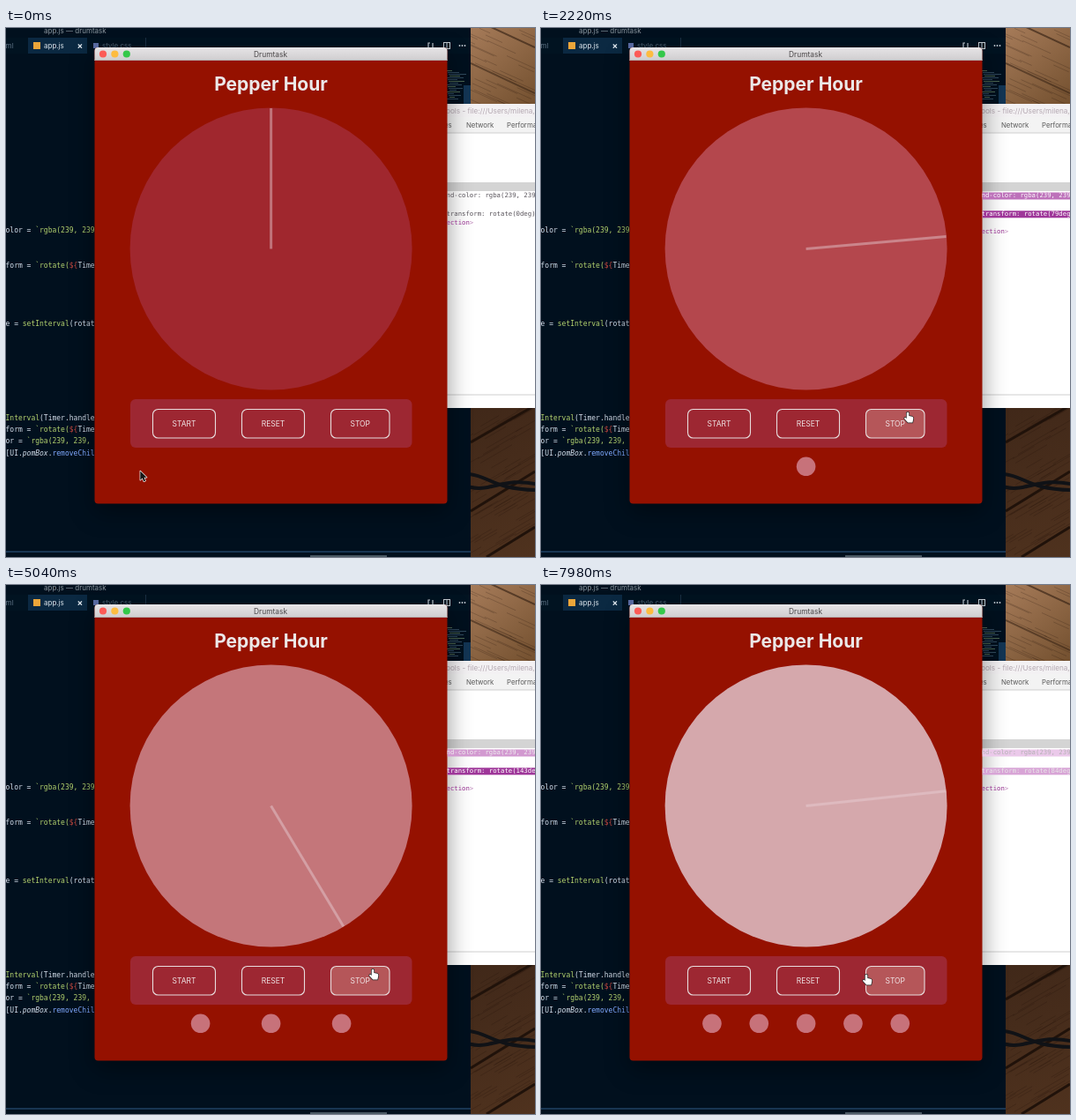
Write an HTML page with a canvas that moves like this. It is 600x600 px and loops after 8 s.

```html
<!DOCTYPE html>
<html lang="en">
<head>
<meta charset="utf-8">
<title>Pepper Hour</title>
<style>
html, body { margin: 0; width: 100%; height: 100%; overflow: hidden; background: #01101e; }
canvas { display: block; width: 100vw; height: 100vh; }
</style>
</head>
<body>
<canvas id="stage" width="600" height="600"></canvas>
<script>
const LOOP = 8000, STEP = 60;
const START = 615, STOP = 7399, MS_PER_DEG = 3.6, TURN = 360 * MS_PER_DEG;
const LAG = 22; // the inspector trails the dial slightly
const SANS = 'Inter, Roboto, sans-serif';
const MONO = '"DejaVu Sans Mono", monospace';
const CENTER = { x: 300.6, y: 250.5, r: 160 };
const DISC = [[160, 39, 46], [180, 71, 77], [189, 92, 98], [196, 118, 122], [204, 144, 146], [213, 168, 172]];
const BUTTONS = [
  { label: 'START', x: 166, w: 72 },
  { label: 'RESET', x: 267, w: 72 },
  { label: 'STOP', x: 368, w: 67.5 }
];
const POINTER = [
  [0, 152.3, 502.5], [150, 152.3, 502.5], [500, 205, 445], [1080, 207, 445],
  [1560, 346.7, 436.5], [1760, 416, 436], [7550, 416, 436], [7980, 369, 442]
];
const ARROW = new Path2D('M0 0V10.2L2.4 8L4 11.8L5.8 11L4.2 7.3H7.3Z');
const HAND = new Path2D('M-1.3 1A1.3 1.3 0 0 1 1.3 1V4L5 4.8Q6.4 5.2 6.3 7L5.4 11.5H.2L-3.8 7.2Q-4 5.6 -2.6 5.8L-1.3 7Z');

const stage = document.getElementById('stage').getContext('2d');
const backdrop = document.createElement('canvas');
backdrop.width = backdrop.height = 600;
let ctx = backdrop.getContext('2d');

const clamp = v => Math.max(0, Math.min(1, v));
const mix = (a, b, k) => a.map((v, i) => v + (b[i] - v) * k);
const rgb = (c, a = 1) => `rgba(${c.map(Math.round).join(',')},${a})`;

let seed = 7;
const random = () => (seed = seed * 16807 % 2147483647) / 2147483647;

function rect(x, y, w, h, fill) {
  ctx.fillStyle = fill;
  ctx.fillRect(x, y, w, h);
}

function box(x, y, w, h, radius, fill, stroke) {
  ctx.beginPath();
  ctx.roundRect(x, y, w, h, radius);
  if (fill) { ctx.fillStyle = fill; ctx.fill(); }
  if (stroke) { ctx.strokeStyle = stroke; ctx.stroke(); }
}

function disc(x, y, r, fill) {
  ctx.beginPath();
  ctx.arc(x, y, r, 0, 7);
  ctx.fillStyle = fill;
  ctx.fill();
}

function line(points, color, width) {
  ctx.beginPath();
  points.forEach(([x, y]) => ctx.lineTo(x, y));
  ctx.strokeStyle = color;
  ctx.lineWidth = width;
  ctx.stroke();
}

function text(s, x, y, font, fill, align = 'left') {
  ctx.font = font;
  ctx.fillStyle = fill;
  ctx.textAlign = align;
  ctx.textBaseline = 'middle';
  ctx.fillText(s, x, y);
}

// Spans are [text, colour, style], laid out one after another.
function code(y, ...spans) {
  let x = -0.5;
  for (const [s, color, style = ''] of spans) {
    text(s, x, y, `${style} 8px ${MONO}`, color);
    x += ctx.measureText(s).width;
  }
}

function drawWood() {
  const wood = (y, h, from, to, slope) => {
    const g = ctx.createLinearGradient(527, y, 600, y + h);
    g.addColorStop(0, from);
    g.addColorStop(1, to);
    rect(527, y, 73, h, g);
    for (let i = 0; i < h / 3; i++) {
      const x = 515 + random() * 70, top = y + random() * h, len = 12 + random() * 30;
      line([[x, top], [x + len, top + len * slope]], 'rgba(25,12,5,.2)', 1);
    }
  };
  ctx.save();
  ctx.beginPath();
  ctx.rect(527, 0, 73, 600);
  ctx.clip();
  wood(425, 175, '#402819', '#4f321e', -0.58);
  wood(0, 87, '#a67b59', '#73502f', 0.45);
  line([[548, -2], [600, 22]], 'rgba(45,27,15,.6)', 2);
  line([[527, 40], [600, 74]], 'rgba(45,27,15,.5)', 2);
  line([[527, 470], [600, 428]], '#20120a', 3);
  line([[527, 548], [600, 503]], '#20120a', 3);
  line([[545, 600], [600, 566]], '#20120a', 3);
  ctx.lineCap = 'round';
  ctx.beginPath();
  ctx.moveTo(524, 506);
  ctx.bezierCurveTo(545, 506, 552, 524, 604, 524);
  ctx.moveTo(524, 520);
  ctx.bezierCurveTo(548, 528, 565, 508, 604, 518);
  ctx.strokeStyle = '#101216';
  ctx.lineWidth = 4;
  ctx.stroke();
  ctx.restore();
}

function drawEditor() {
  const white = '#d6deeb', green = '#b5d36f', red = '#c9483f', blue = '#82aaff';
  const sans = size => `${size}px ${SANS}`;
  rect(0, 0, 527, 600, '#01101e');
  text('app.js — drumtask', 43, 3.8, sans(8), '#8b959e');
  rect(0, 11, 527, 18, '#011321');
  rect(25, 11, 67, 18, '#0b2942');
  text('tml', -3, 20.7, sans(8), '#5f7385');
  rect(31, 16, 8, 8, '#eca63a');
  text('app.js', 43, 20.7, sans(8), '#dfe7ee');
  text('×', 84, 20.5, `bold 10px ${SANS}`, '#dfe7ee', 'center');
  rect(99, 17, 6, 6, '#5b6da6');
  text('style.css', 109, 20.7, sans(8), '#4d6071');
  rect(158, 11, 1, 18, '#1a3044');

  ctx.strokeStyle = '#c5ccd2';
  ctx.lineWidth = 1;
  ctx.strokeRect(496.5, 16.5, 7, 7);
  line([[500, 16], [500, 24]], '#c5ccd2', 1);
  line([[481, 17], [479, 17], [479, 23]], '#c5ccd2', 1.2);
  line([[482, 23], [484, 23], [484, 17]], '#c5ccd2', 1.2);
  for (const x of [514.5, 517.5, 520.5]) disc(x, 20, 0.9, '#c5ccd2');

  for (let i = 0; i < 17; i++) {
    rect(500 + (i * 5) % 4, 48 + i * 2, 6 + (i * 7) % 15, 1, i % 3 ? '#31495c' : '#4d6652');
  }
  rect(519, 65, 8, 21, 'rgba(35,85,130,.55)');

  code(229.8, ['olor', white], [' = ', white], ['`rgba(239, 239', green]);
  code(269.8, ['form', white], [' = ', white], ['`rotate(', green], ['${', red], ['Time', white]);
  code(336.4, ['e = ', white], ['setInterval', green], ['(rotat', white]);
  code(442.8, ['Interval', green], ['(Timer.handle', white]);
  code(456, ['form = ', white], ['`rotate(', green], ['${', red], ['Time', white]);
  code(469.4, ['or = ', white], ['`rgba(239, 239,', green]);
  code(482.8, ['[UI.', white], ['pomBox', white, 'italic'], ['.', white], ['removeChil', blue]);

  rect(0, 593.5, 527, 1, '#315a86');
  rect(345, 598, 87, 2, '#4a5964');
}

function drawInspector() {
  rect(490, 86, 110, 345, '#fff');
  rect(490, 86, 110, 15, '#f3f1f3');
  text('ools - file:///Users/milena,', 499, 94.8, `8.2px ${SANS}`, '#b4a8b1');
  rect(490, 101, 110, 18, '#f3f3f3');
  rect(490, 118.5, 110, 1, '#d0d0d0');
  text('es', 497, 110.3, `7.8px ${SANS}`, '#5a5a5a');
  text('Network', 522, 110.3, `7.8px ${SANS}`, '#5a5a5a');
  text('Performance', 568, 110.3, `7.8px ${SANS}`, '#5a5a5a');
  rect(490, 175, 110, 10, '#d4d4d4');
  rect(490, 415.5, 110, 1, '#d0d0d0');
}

function drawWindow() {
  ctx.save();
  ctx.shadowColor = 'rgba(0,0,0,.42)';
  ctx.shadowBlur = 28;
  ctx.shadowOffsetY = 9;
  box(100.5, 22, 400, 517.5, 4, '#951100');
  ctx.restore();
  const bar = ctx.createLinearGradient(0, 22, 0, 37);
  bar.addColorStop(0, '#e6e4e6');
  bar.addColorStop(1, '#cfcdcf');
  box(100.5, 22, 400, 15, [4, 4, 0, 0], bar);
  rect(100.5, 36, 400, 1, '#b5a9a9');
  ['#fc5b57', '#fdbc40', '#34c84a'].forEach((c, i) => disc(110 + i * 13.4, 29.5, 4.1, c));
  text('Drumtask', 300, 30, `8.4px ${SANS}`, '#4a4648', 'center');
  text('Pepper Hour', 300.5, 65, `bold 21px ${SANS}`, '#ece8e8', 'center');
  box(141, 421, 319.5, 55, 6, '#9d2732');
}

function pointerAt(t) {
  const i = Math.max(1, POINTER.findIndex(p => p[0] >= t));
  const [t0, x0, y0] = POINTER[i - 1], [t1, x1, y1] = POINTER[i];
  const k = clamp((t - t0) / (t1 - t0));
  return { x: x0 + (x1 - x0) * k, y: y0 + (y1 - y0) * k };
}

const inside = (b, p) => p.x >= b.x && p.x <= b.x + b.w && p.y >= 432 && p.y <= 465;

// Share of the last moments spent over a button: a short fade in and out.
function hover(b, t) {
  let hits = 0;
  for (let i = 0; i < 12; i++) hits += inside(b, pointerAt(Math.max(0, t - i * 20)));
  return hits / 12;
}

function attribute(s, y, age) {
  const purple = [158, 54, 153], pale = [245, 219, 244], ink = [90, 85, 92];
  let color = ink;
  if (age >= 0 && age < 1400) {
    const p = clamp(age / 1120);
    const fade = 1 - clamp((age - 1120) / 280);
    rect(500.5, y - 4, 99.5, 8, rgb(mix(purple, pale, 1 - (1 - p) ** 1.5), fade));
    color = mix([255, 255, 255], ink, p ** 3);
  }
  text(s, 499.5, y, `7.3px ${MONO}`, rgb(color));
}

function drawAttributes(t, turns) {
  const seen = t - LAG;
  const shown = Math.floor(Math.max(0, Math.min(seen, STOP) - START) / MS_PER_DEG);
  ctx.save();
  ctx.beginPath();
  ctx.rect(500.5, 120, 100, 290);
  ctx.clip();
  attribute('nd-color: rgba(239, 239,', 190.5, turns ? seen - START - turns * TURN : -1);
  attribute(`transform: rotate(${shown % 360}deg)`, 211.3, seen >= START ? Math.max(0, t - STOP) : -1);
  const y = shown >= 10 ? 231.5 : 221.5;
  text('ection', 499.5, y, `7.3px ${MONO}`, '#95308f');
  text('>', 525.8, y, `7.3px ${MONO}`, '#c08abd');
  ctx.restore();
}

function drawTimer(angle, turns) {
  const base = DISC[turns];
  disc(CENTER.x, CENTER.y, CENTER.r, rgb(base));
  ctx.save();
  ctx.translate(CENTER.x, CENTER.y);
  ctx.rotate(angle * Math.PI / 180);
  rect(-1.5, -159.5, 3, 159.5, rgb(mix(base, [232, 208, 215], 0.45)));
  ctx.restore();
  for (let i = 1; i <= turns; i++) {
    disc(140.6 + 320 * i / (turns + 1), 497.3, 10.8, '#c7727a');
  }
}

function drawButtons(t) {
  ctx.lineWidth = 1.1;
  for (const b of BUTTONS) {
    const fill = mix([157, 39, 50], [181, 86, 89], hover(b, t));
    box(b.x + 0.5, 432.5, b.w - 1, 32.5, 6, rgb(fill), '#e8dcdd');
    text(b.label, b.x + b.w / 2, 449.2, `8.5px ${SANS}`, '#eee3e4', 'center');
  }
}

function drawPointer(t) {
  const p = pointerAt(t);
  const pressing = BUTTONS.some(b => inside(b, p));
  const shape = pressing ? HAND : ARROW;
  ctx.save();
  ctx.translate(p.x, p.y);
  ctx.lineJoin = 'round';
  ctx.lineWidth = 1.4;
  ctx.strokeStyle = pressing ? '#222' : '#f2eeee';
  ctx.fillStyle = pressing ? '#fff' : '#151515';
  ctx.stroke(shape);
  ctx.fill(shape);
  ctx.restore();
}

function draw(t) {
  const degrees = Math.floor(Math.max(0, Math.min(t, STOP) - START) / MS_PER_DEG);
  const turns = Math.floor(degrees / 360);
  ctx.drawImage(backdrop, 0, 0);
  drawAttributes(t, turns);
  drawTimer(degrees % 360, turns);
  drawButtons(t);
  drawPointer(t);
}

drawWood();
drawEditor();
drawInspector();
drawWindow();
ctx = stage;

const begin = performance.now();
function tick() {
  const t = (performance.now() - begin) % LOOP;
  draw(Math.floor(t / STEP) * STEP);
  requestAnimationFrame(tick);
}
tick();
</script>
</body>
</html>
```
